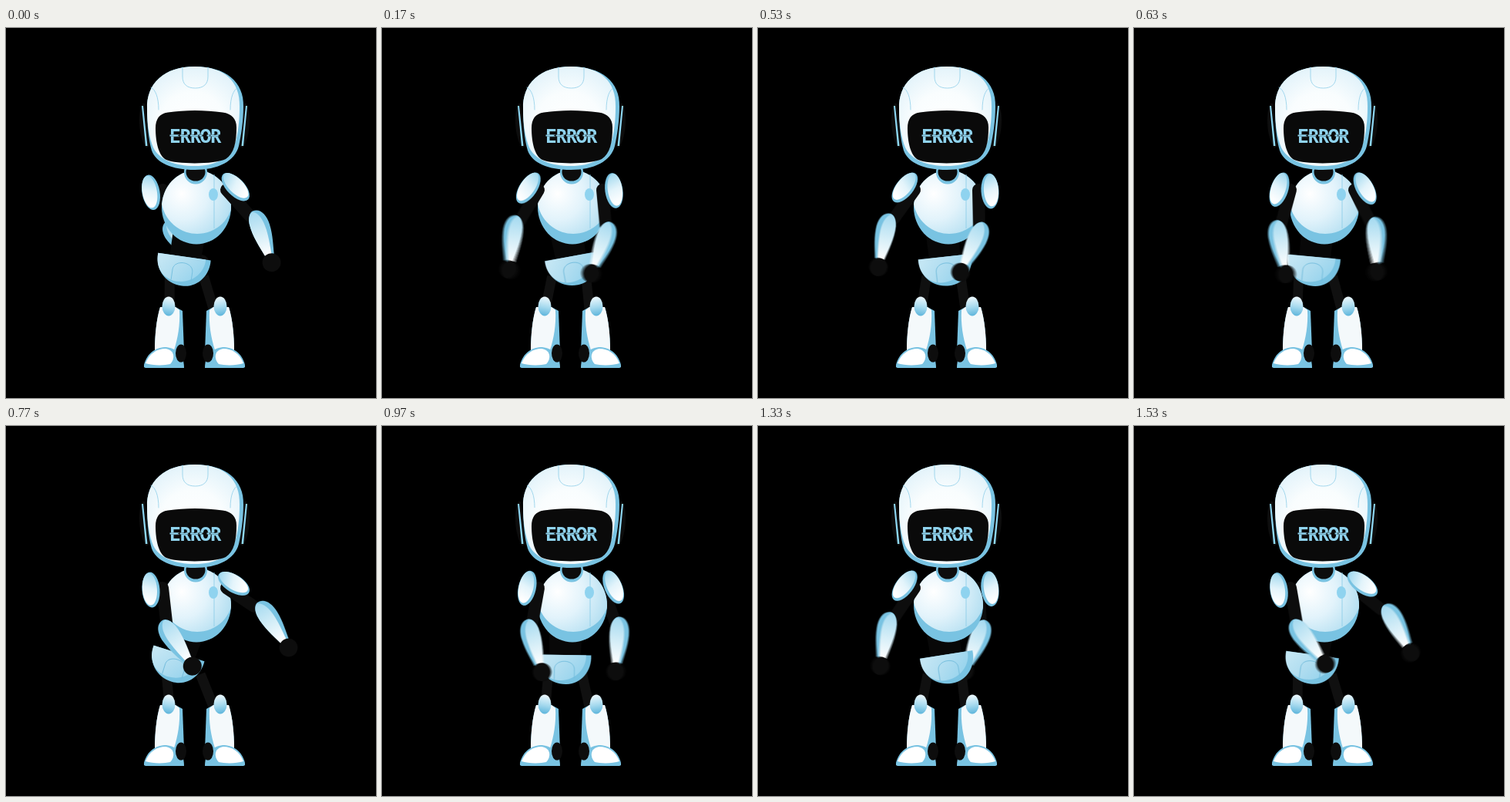
Animation of 480 by 480 pixels, one loop 1560 ms. Source, as an HTML page with a canvas:

```html
<!DOCTYPE html>
<html lang="en">
<head>
<meta charset="utf-8">
<title>Dancing robot</title>
<style>
  html, body { margin: 0; width: 100%; height: 100%; overflow: hidden; background: #000; }
  canvas { display: block; width: 480px; height: 480px; }
</style>
</head>
<body>
<canvas id="stage" width="480" height="480"></canvas>
<script>
const LOOP = 1560, STEP = 100 / 3, LAST = 46;
const BLUE = '#79c3e2', LINE = '#8fcfe9', DARK = '#0d0d0d', MIRROR = 489;

const stage = document.getElementById('stage').getContext('2d');
const buffer = document.createElement('canvas');
buffer.width = buffer.height = 480;
const g = buffer.getContext('2d');

// Swing keys: forearm angles in degrees (outward positive), hip shift in pixels.
const TIMES = [-110, 0, 300, 330, 530, 770, 970, 1165, 1330, 1530, 1600];
const RIGHT = [33, 17, -43, -41, -27, 32, -8, -42, -24, 27, 33];
const LEFT = [-47, -42, 31, 29, 9.6, -36, -16, 32, 8, -40, -42];
const HIPS = [-13, -6, 14.5, 14, 4.5, -13, 0, 14, 6.5, -6, -13];

// Hermite curve through the keys, flat at every turning point.
function curve(keys, t) {
  const slope = i => {
    const before = keys[i] - keys[i - 1], after = keys[i + 1] - keys[i];
    return before * after > 0 ? (before + after) / (TIMES[i + 1] - TIMES[i - 1]) : 0;
  };
  let i = 0;
  while (i < TIMES.length - 2 && t >= TIMES[i + 1]) i++;
  const d = TIMES[i + 1] - TIMES[i], u = (t - TIMES[i]) / d, v = 1 - u;
  return v * v * (1 + 2 * u) * keys[i] + u * u * (3 - 2 * u) * keys[i + 1]
    + d * u * v * (v * slope(i) - u * slope(i + 1));
}

function fill(color, d) {
  g.fillStyle = color;
  g.fill(new Path2D(d));
}

function stroke(color, width, d) {
  g.strokeStyle = color;
  g.lineWidth = width;
  g.stroke(new Path2D(d));
}

function ellipse(color, x, y, rx, ry, angle = 0) {
  g.fillStyle = color;
  g.beginPath();
  g.ellipse(x, y, rx, ry, angle, 0, 2 * Math.PI);
  g.fill();
}

function blend(gradient, colors) {
  colors.forEach((c, i) => gradient.addColorStop(i / (colors.length - 1), c));
  return gradient;
}
const linear = (x0, y0, x1, y1, ...colors) => blend(g.createLinearGradient(x0, y0, x1, y1), colors);
const radial = (x, y, r, ...colors) => blend(g.createRadialGradient(x, y, 0, x, y, r), colors);

function placed(x, y, angle, draw) {
  g.save();
  g.translate(x, y);
  g.rotate(angle);
  draw();
  g.restore();
}

function mirrored(draw) {
  g.save();
  g.translate(MIRROR, 0);
  g.scale(-1, 1);
  draw();
  g.restore();
}

function bothSides(draw) {
  draw();
  mirrored(draw);
}

const rad = deg => deg * Math.PI / 180;
const upperAngle = swing => 0.93 * swing + 29;

// Arms are described for the right side of the stage.
function arm(swing) {
  const a = upperAngle(swing), b = rad(swing);
  const reach = 50 - 0.1 * Math.max(a, 0);
  const x = 292 + reach * Math.sin(rad(a)), y = 205 + reach * Math.cos(rad(a));
  g.lineCap = 'round';
  stroke(DARK, 16, `M286 210L${x - 8} ${y + 6}`);
  placed(x, y, -b, () => {
    fill(BLUE, 'M-4 -1C6 -2 12 8 12 22C12 38 8 50 6 62H-5C-9 46 -14 30 -13 14C-12 6 -9 0 -4 -1Z');
    fill(linear(0, 0, 0, 60, '#a5daf0', '#d3edf7', '#fff'),
      'M-4 0C3 4 6 14 6 27C6 40 4 52 3 62H-5C-9 46 -14 30 -13 14C-12 6 -9 1 -4 0Z');
    ellipse(DARK, 0, 70, 12, 12);
  });
}

function pad(swing) {
  const a = upperAngle(swing), out = Math.max(a, 0);
  placed(301 - 0.0016 * out * out, 212 - 0.13 * a, -rad(a), () => {
    ellipse(BLUE, 0, 0, 11.5, 23);
    ellipse(linear(6, 15, -6, -18, '#fff', '#e3f4fb', '#a9dcf0'), 1.5, -1, 9.5, 21);
  });
}

function lowerLeg() {
  fill(BLUE, 'M200 362L220 362L229 367L231 420H193C193 400 195 378 200 362Z');
  fill('#f4f9fb', 'M200 362L220 362L225 366C226 385 223 402 218 418H193C193 400 195 378 200 362Z');
  ellipse(linear(213, 350, 209, 373, '#e8f6fc', '#a9dbef', '#5fb6dc'), 211, 361, 8.5, 12.5);
  fill(BLUE, 'M179 440V437C183 421 195 414 208 414C222 416 231 424 231 441H181Z');
  fill('#fff', 'M181 435C186 422 196 416 207 416C220 418 219 430 213 436C205 438 190 438 181 435Z');
  ellipse(DARK, 227, 422, 7, 11.5);
}

function pelvis(x, y, angle) {
  placed(x, y, angle, () => {
    fill(BLUE, 'M-34.5 0H34.5C36 20 22 38 2 38C-20 38 -35 22 -34.5 0Z');
    fill(linear(-25, 0, 15, 32, '#c3e6f4', '#b0ddf0', '#98d4ed'),
      'M-34.5 0H28C29 16 16 32 -3 33C-12 34 -22 30 -27 24C-33 17 -35 9 -34.5 0Z');
    stroke('#75bfdf', 0.9, 'M-13 32V18C-12 5 12 5 13 18V30');
  });
}

function torso() {
  ellipse(BLUE, 247, 232.5, 45, 48);
  g.save();
  g.beginPath();
  g.ellipse(247, 232.5, 45, 48, 0, 0, 2 * Math.PI);
  g.clip();
  ellipse(radial(228, 215, 68, '#fff', '#e2f3fb', '#b4dff1'), 248, 219, 47, 48, -0.08);
  g.restore();
  stroke(LINE, 0.9, 'M270 190V260');
  ellipse('#8fd3ef', 269, 216, 6, 8);
  ellipse(BLUE, 246, 187, 15, 15.5);
  ellipse(DARK, 246, 187, 12.5, 11.5);
}

function head() {
  bothSides(() => {
    fill(DARK, 'M177 98C171 108 171 140 182 156L187 152L180 98Z');
    fill('#8ed8f4', 'M176 101L178 101L183.500 153L181 153Z');
  });
  fill(BLUE, 'M183 105C182 72 205 50 245 50C285 50 309 70 308 102C308 120 305 140 302 153'
    + 'C297 173 275 184 245 184C215 184 195 175 189 159C185 146 183 125 183 105Z');
  fill(radial(242, 125, 85, '#fff', '#f9fdfe', '#dcf0f9'),
    'M183 105C182 72 205 50 245 50C284 50 304 70 303 102C303 120 301 138 297 150'
    + 'C291 169 272 179 245 179C219 179 199 171 191 155C186 143 183 125 183 105Z');
  stroke(LINE, 0.8, 'M229 51V63C229 73 235 78 245.500 78S262 73 262 63V51');
  bothSides(() => stroke(LINE, 0.8, 'M188 77C194 80 198 90 198 106'));
  fill('#0a0a0a', 'M194 130C194 118 199 111 210 109.500C232 106 258 106 281 109.500C293 111 299 118 299 129'
    + 'C299 148 296 163 285 170C272 177 221 177 208 171C198 166 194 148 194 130Z');
  message();
}

// The word is cut into bands; the thin middle one is shifted sideways.
function message() {
  g.font = 'bold 25px "Noto Sans Mono", monospace';
  g.letterSpacing = '-1.8px';
  g.fillStyle = '#8fd3ee';
  for (const [top, height, shift] of [[126, 12.5, 0], [138.5, 2, -1.5], [140.5, 12, 0]]) {
    g.save();
    g.beginPath();
    g.rect(205, top, 82, height);
    g.clip();
    g.fillText('ERROR', 212 + shift, 148.5);
    g.restore();
  }
}

function drawScene(t) {
  const right = curve(RIGHT, t), left = curve(LEFT, t), shift = curve(HIPS, t);
  const rightInFront = t < 770, leftInFront = t > 150;
  const x = 237.5 + shift, y = 297 - 0.012 * shift * shift, tilt = -rad(1.35 * shift);
  const rightArm = () => arm(right), leftArm = () => mirrored(() => arm(left));

  g.fillStyle = '#000';
  g.fillRect(0, 0, 480, 480);
  if (!rightInFront) rightArm();
  if (!leftInFront) leftArm();

  g.lineCap = 'butt';
  for (const [hip, knee] of [[216, 212], [260, 269]]) {
    stroke('#101010', 13, `M${hip + 0.6 * shift} 322L${knee} 364`);
  }
  bothSides(lowerLeg);
  fill('#080808', `M217 262H260L${x + 21} ${y + 6}H${x - 20}Z`);
  pelvis(x, y, tilt);
  torso();

  if (rightInFront) rightArm();
  if (leftInFront) leftArm();
  pad(right);
  mirrored(() => pad(left));
  head();
}

// Average a few moments before t for motion blur.
function render(t) {
  for (let i = 0; i < 6; i++) {
    drawScene(Math.max(0, t - 2.2 * i));
    stage.globalAlpha = 1 / (i + 1);
    stage.drawImage(buffer, 0, 0);
  }
}

let shown = -1;
function tick(now) {
  const t = Math.floor(now % LOOP / 10) * 10;
  const step = Math.min(LAST, Math.floor((t + 5) / STEP));
  if (step !== shown) render((shown = step) * STEP);
  requestAnimationFrame(tick);
}
tick(performance.now());
</script>
</body>
</html>
```
